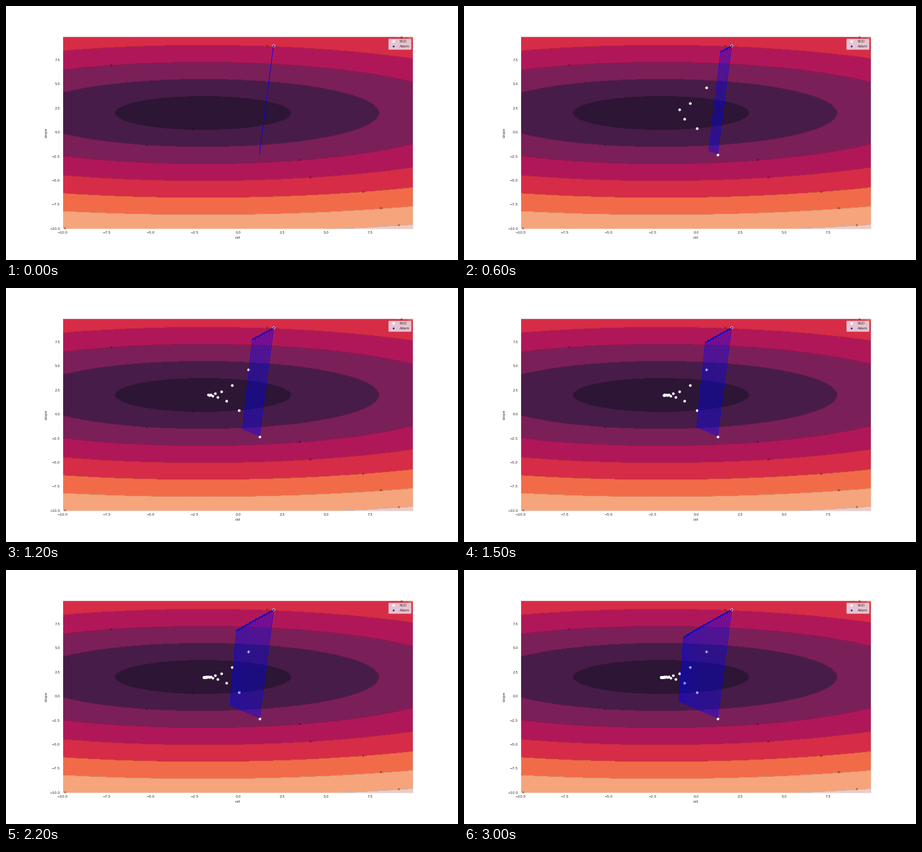
These frames come from a looping animation (720 px wide and 405 px high, 3100 ms). A matplotlib script:

```python
import numpy as np
import matplotlib.pyplot as plt
from matplotlib.animation import FuncAnimation
from matplotlib.collections import LineCollection

W, H, DPI = 720, 405, 36
FRAMES, INTERVAL = 31, 100
LR = 0.1
CENTER = np.array([-2.0, 2.0])
CURVE = np.array([1.0, 8.07])
START = np.array([2.0, 9.0])
INK = "#38202c"
BANDS = ["#2c1535", "#481c48", "#7b1f59", "#b01759",
         "#d62c47", "#f26b49", "#f6a47b", "#efcac4"]


def grad(p):
    return 2 * CURVE * (p - CENTER)


def sgd_path(n):
    path = [START]
    for _ in range(n - 1):
        path.append(path[-1] - LR * grad(path[-1]))
    return np.array(path)


def adam_path(n, b1=0.9, b2=0.999):
    path, m, v = [START], np.zeros(2), np.zeros(2)
    for t in range(1, n):
        g = grad(path[-1])
        m = b1 * m + (1 - b1) * g
        v = b2 * v + (1 - b2) * g ** 2
        step = (m / (1 - b1 ** t)) / np.sqrt(v / (1 - b2 ** t))
        path.append(path[-1] - LR * step)
    return np.array(path)


plt.rcParams["font.family"] = "DejaVu Sans"
fig = plt.figure(figsize=(W / DPI, H / DPI), dpi=DPI, facecolor="white")
left, right, top, bottom = 89.6, 647.6, 49.2, 354.9
ax = fig.add_axes([left / W, 1 - bottom / H,
                   (right - left) / W, (bottom - top) / H])

# Loss surface
axis = np.arange(-10, 10, 0.1)
X, Y = np.meshgrid(axis, axis)
Z = np.sqrt(CURVE[0] * (X - CENTER[0]) ** 2 + CURVE[1] * (Y - CENTER[1]) ** 2)
levels = np.arange(0, 41, 5)
ax.contourf(X, Y, Z, levels=levels, colors=BANDS)
ax.contour(X, Y, Z, levels=levels[1:-1], colors="black",
           linewidths=0.6, alpha=0.45)
ax.set_xlim(-10, 9.9)
ax.set_ylim(-10, 9.9)


def contour_label(level, x, side):
    """Write the level on its ellipse at x, above (+1) or below (-1) the centre."""
    dx = x - CENTER[0]
    dy = side * np.sqrt((level ** 2 - dx ** 2) / CURVE[1])
    slope = -dx / (CURVE[1] * dy) * (bottom - top) / (right - left)
    ax.text(x, CENTER[1] + dy, str(level), fontsize=8, color="black",
            alpha=0.7, ha="center", va="center",
            rotation=np.degrees(np.arctan(slope)))


for level, x, side in [(5, -2.6, -1), (10, -5.2, -1), (15, 3.5, -1),
                       (15, -7.2, 1), (20, 1.65, 1), (20, 4.1, -1),
                       (25, 9.3, 1), (25, 7.1, -1), (30, 8.1, -1),
                       (35, 9.15, -1), (35, -9.85, -1)]:
    contour_label(level, x, side)

# Axes dressing
ticks = np.arange(-10, 8, 2.5)
ax.set_xticks(ticks)
ax.set_yticks(ticks)
ax.tick_params(length=0, labelsize=11, labelcolor=INK)
ax.tick_params(axis="x", pad=9)
ax.tick_params(axis="y", pad=7)
ax.set_xlabel("cst", fontsize=12, color=INK, labelpad=6)
ax.set_ylabel("slope", fontsize=12, color=INK, labelpad=5)
for spine in ax.spines.values():
    spine.set(color="0.8", linewidth=1)
ax.spines["left"].set(color="white", linewidth=2)

# Optimiser traces
sgd, adam = sgd_path(FRAMES), adam_path(FRAMES)
rays = np.stack([adam, adam - LR * grad(adam)], axis=1)

sgd_dots, = ax.plot([], [], "o", color="white", ms=8.5, mew=0,
                    label="SGD", zorder=3)
ray_lines = LineCollection([], colors="blue", linewidths=1.75, zorder=4)
ax.add_collection(ray_lines, autolim=False)
adam_dots, = ax.plot([], [], "o", color="#0a0ac0", ms=5.5, mew=0,
                     label="Adam", zorder=5)

legend = ax.legend(loc="upper right", fontsize=11, labelcolor=INK,
                   framealpha=0.8, facecolor="#eaeaf2", edgecolor="0.8")
legend.set_zorder(6)


def update(i):
    sgd_dots.set_data(*sgd[:i + 1].T)
    adam_dots.set_data(*adam[:i + 1].T)
    ray_lines.set_segments(rays[:i + 1])
    return sgd_dots, ray_lines, adam_dots


anim = FuncAnimation(fig, update, frames=FRAMES, interval=INTERVAL,
                     init_func=lambda: update(0), repeat=True, repeat_delay=0)
plt.show()
```
